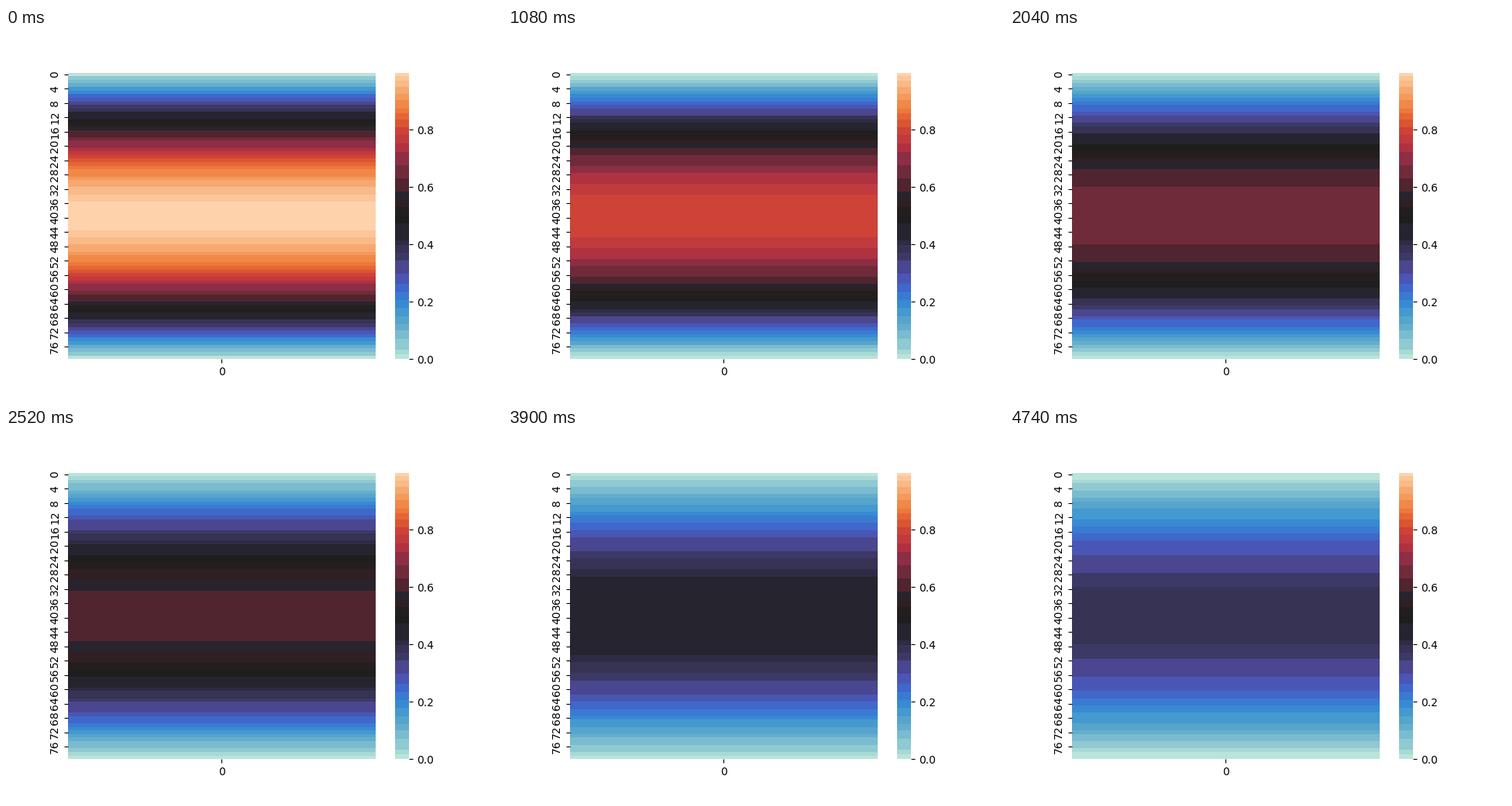
A matplotlib script for the animation above (4.8 s loop, 640 by 480 pixels).

```python
import numpy as np
import matplotlib.pyplot as plt
from matplotlib.animation import FuncAnimation
from matplotlib.colors import BoundaryNorm, ListedColormap

CELLS = 80
FRAMES = 80
DECAY = 0.012  # loss per step of the fundamental sine mode

# Lower edge of each colour band, from ice through black to fire.
BANDS = {
    0.000: "#bae4da", 0.017: "#a9d9d5", 0.033: "#8fc9d1", 0.070: "#7abbcf",
    0.100: "#64aecd", 0.121: "#57a4cc", 0.150: "#4499cf", 0.178: "#388ad2",
    0.205: "#3a7bd2", 0.232: "#4068ca", 0.262: "#4a56b6", 0.298: "#4a4790",
    0.344: "#3d3967", 0.370: "#363354", 0.398: "#2f2b44", 0.415: "#26242e",
    0.474: "#1e1e1e", 0.503: "#241f1e", 0.530: "#2e2023", 0.556: "#28242e",
    0.584: "#50252f", 0.632: "#702b3a", 0.676: "#8d2e45", 0.722: "#b03140",
    0.752: "#c03a3e", 0.782: "#ce4237", 0.810: "#dc5532", 0.837: "#e56634",
    0.858: "#ed783c", 0.875: "#f08848", 0.905: "#f39a5c", 0.925: "#f6a96f",
    0.950: "#fab988", 0.972: "#fcc699", 0.987: "#fed2aa",
}

start = np.sin(np.pi * np.linspace(0, 1, CELLS))
top = start.max()
edges = np.array([*BANDS, top])
cmap = ListedColormap(list(BANDS.values()))
norm = BoundaryNorm(edges, cmap.N)


def temperature(step):
    return np.clip(start * np.exp(-DECAY * step), 0, top - 1e-9)


def strip(ax, bounds, values):
    """Draw a one-column heat map on a frameless axes."""
    for spine in ax.spines.values():
        spine.set_visible(False)
    return ax.pcolormesh([0, 1], bounds, values[:, None], cmap=cmap, norm=norm)


plt.rcParams["font.family"] = "DejaVu Sans"
fig = plt.figure(figsize=(6.4, 4.8), dpi=100, facecolor="white")

ax = fig.add_axes([0.125, 0.11, 0.62, 0.77])
heat = strip(ax, np.arange(CELLS + 1), temperature(0))
ax.set_xlim(0, 1)
ax.set_ylim(CELLS, 0)
ax.set_xticks([0.5], ["0"])
rows = np.arange(0, CELLS, 4)
ax.set_yticks(rows + 0.5, [str(r) for r in rows], rotation=90, va="center")

bar = fig.add_axes([0.78375, 0.11, 0.77 * 480 / 20 / 640, 0.77])
strip(bar, edges, (edges[:-1] + edges[1:]) / 2)
bar.set_xlim(0, 1)
bar.set_ylim(0, top)
bar.set_xticks([])
bar.yaxis.tick_right()
bar.set_yticks([0, 0.2, 0.4, 0.6, 0.8])


def draw(step):
    heat.set_array(temperature(step)[:, None])
    return [heat]


anim = FuncAnimation(fig, draw, frames=FRAMES, interval=60,
                     repeat=True, repeat_delay=0)
plt.show()
```
